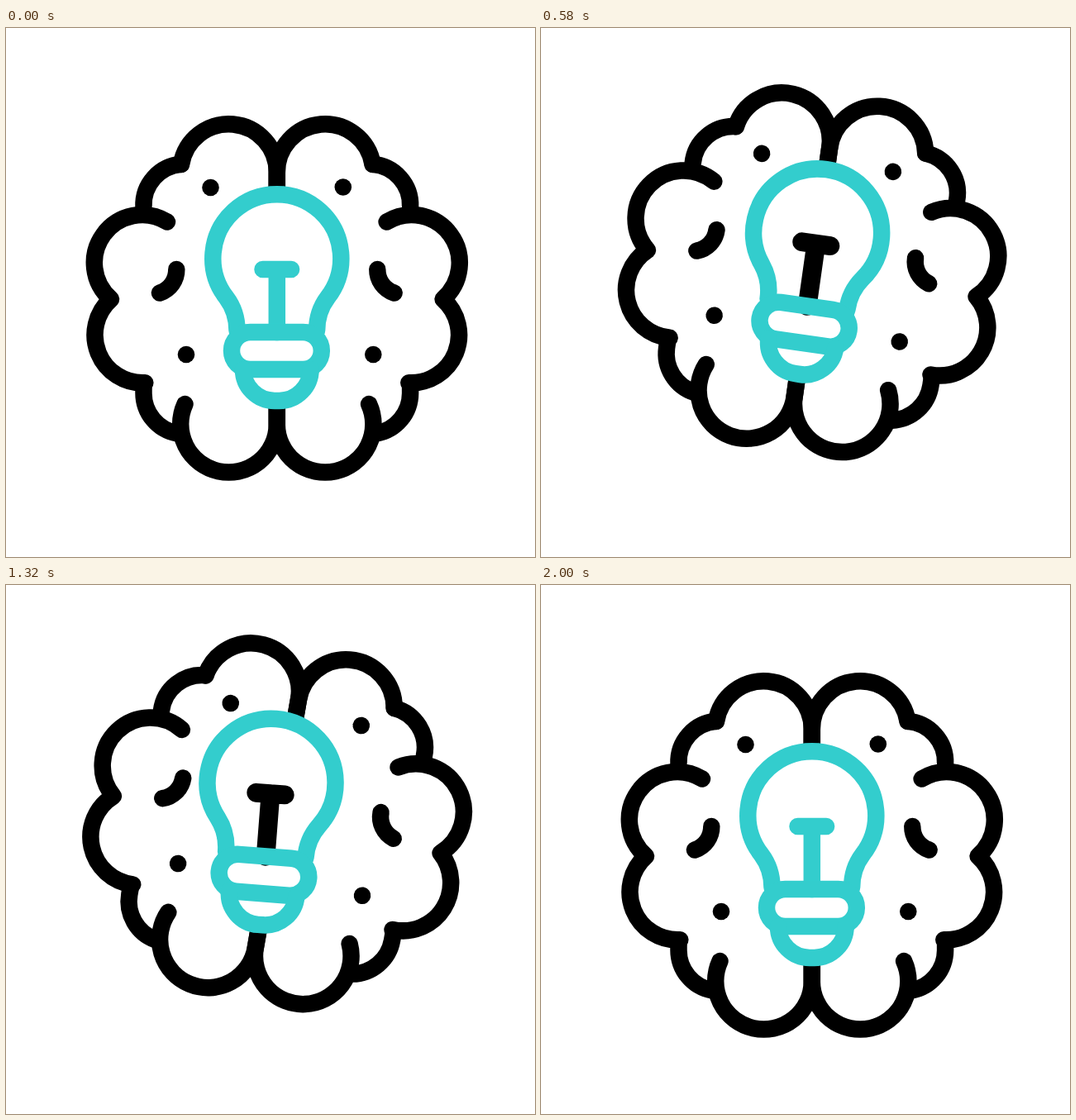
Write an HTML page that moves like this. It is 640 px wide and 640 px high and loops after 2020 ms.

```html
<!DOCTYPE html>
<html lang="en">
<head>
<meta charset="utf-8">
<title>Bright idea</title>
<style>
  html, body { margin: 0; width: 100%; height: 100%; overflow: hidden; background: #fff; }
  svg { display: block; width: 100vw; height: 100vh; }
  .line { fill: none; stroke: #000; stroke-width: 20.5; stroke-linecap: round; stroke-linejoin: round; }
  .teal { stroke: #33cdcd; }
  .dark { stroke-width: 22.8; }
</style>
</head>
<body>
<svg viewBox="0 0 640 640">
  <defs>
    <g id="half">
      <path d="M212 165A58.3 58.3 0 0 1 327.8 175.6V198"/>
      <path d="M212 164.8A49.5 49.5 0 0 0 166.5 216"/>
      <path d="M195 234.5A58 58 0 0 0 127 328A58 58 0 0 0 168.3 429.3"/>
      <path d="M166.5 433V442A49.5 49.5 0 0 0 207 490.5"/>
      <path d="M216.5 455A58.3 58.3 0 1 0 327.8 479.7V453"/>
      <path d="M206.3 292A29.5 29.5 0 0 1 186 320.5"/>
    </g>
    <path id="filament" d="M310.5 292H345.1M327.8 292V368"/>
  </defs>
  <g id="brain">
    <g class="line">
      <use href="#half"/>
      <use href="#half" transform="matrix(-1 0 0 1 655.6 0)"/>
    </g>
    <g id="dots"></g>
    <g id="bulb">
      <use href="#filament" class="line teal"/>
      <use href="#filament" class="line dark" id="dark"/>
      <g class="line teal">
        <path d="M279.5 366C279.5 350 274 336 266.3 325.8A77.5 77.5 0 1 1 389.3 325.8C381.6 336 376.1 350 376.1 366"/>
        <rect x="273" y="368" width="108.8" height="45" rx="22.5"/>
        <path d="M287 413A38 38 0 0 0 325 451H330.6A38 38 0 0 0 368.6 413"/>
      </g>
    </g>
  </g>
</svg>
<script>
  const LOOP = 2020, STEP = 20;
  const $ = id => document.getElementById(id);

  // [time, value] keys, eased between neighbours
  const lift = [[0, 0], [1000, 1], [2000, 0]];
  const tilt = [[70, 0], [290, 7], [520, 0], [1050, 0], [1240, -7], [1500, 0]];
  const shade = [[60, 0], [240, 1], [1560, 1], [1700, 0]];

  const ease = x => x * x * (3 - 2 * x);

  function at(keys, t) {
    if (t <= keys[0][0]) return keys[0][1];
    for (let i = 1; i < keys.length; i++) {
      const [t0, a] = keys[i - 1], [t1, b] = keys[i];
      if (t <= t1) return a + (b - a) * ease((t - t0) / (t1 - t0));
    }
    return keys[keys.length - 1][1];
  }

  $('dots').innerHTML = [[247.5, 193], [407.8, 192.5], [218, 395], [444.3, 395]]
    .map(([x, y]) => `<circle cx="${x}" cy="${y}" r="10.3"/>`).join('');

  function draw(t) {
    const s = at(lift, t);
    $('brain').setAttribute('transform', `translate(0 ${-50.4 * s}) rotate(${13 * s} 327.6 327.6)`);
    $('bulb').setAttribute('transform', `rotate(${at(tilt, t)} 327.8 440)`);
    $('dark').setAttribute('opacity', at(shade, t));
  }

  const start = performance.now();
  function tick() {
    const t = (performance.now() - start) % LOOP;
    draw(Math.floor(t / STEP) * STEP);
    requestAnimationFrame(tick);
  }
  tick();
</script>
</body>
</html>
```
